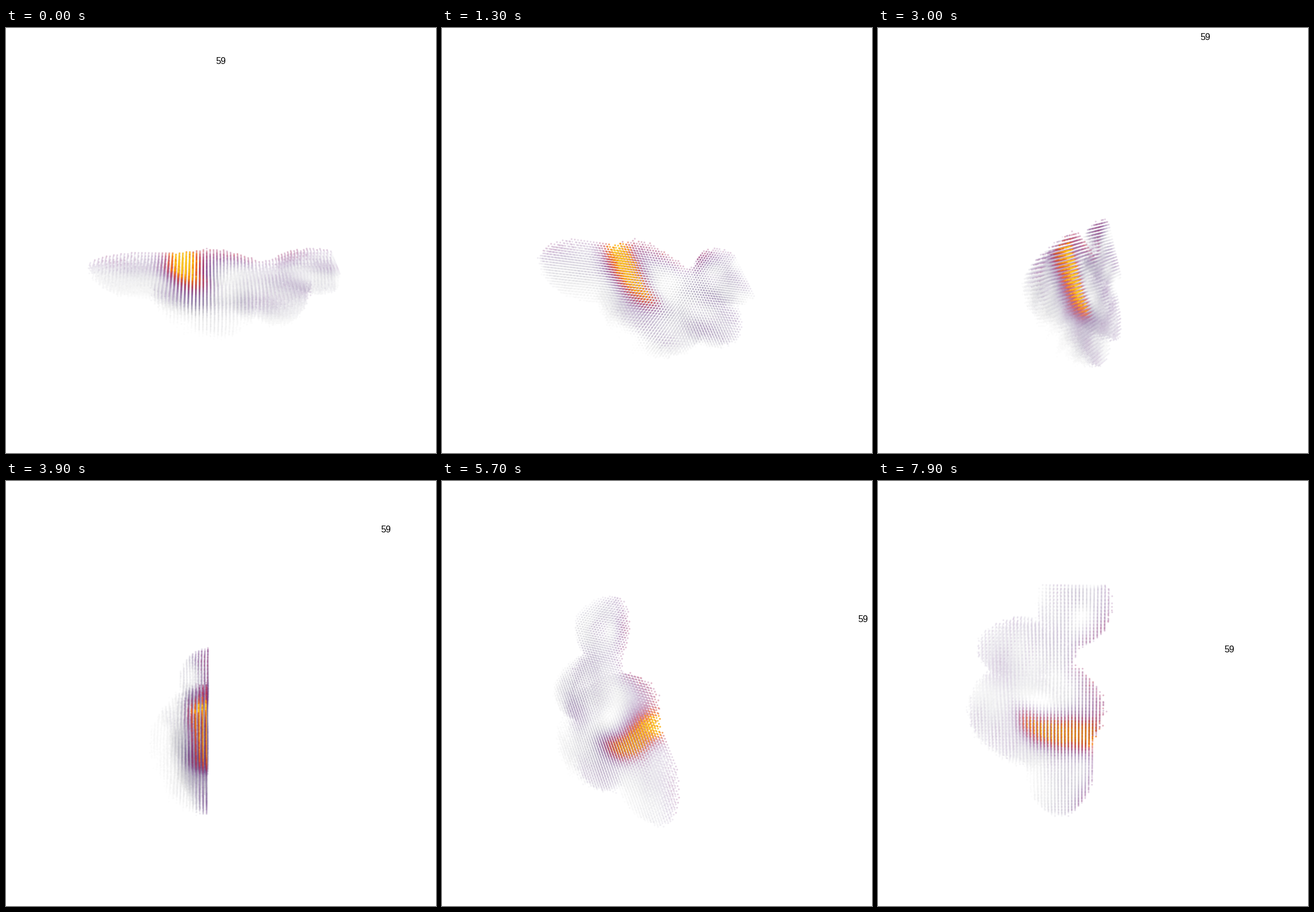
Animation, 753 px wide and 744 px high, one loop 8000 ms. Source, as a matplotlib script:

```python
import numpy as np
import matplotlib.pyplot as plt
from matplotlib.animation import FuncAnimation

W, H, DPI = 753, 744, 100
FRAMES, INTERVAL = 80, 100
START, STEP = np.radians(2), np.radians(3.025)  # turn about the cube diagonal
TILT = np.radians(19.7)                         # camera elevation
DIST = 1415                                     # camera distance in pixels
CX, CY = 376, 372
GRID = 6
MIDLINE = -25
LABEL = (285.4, 0, 269.4)

# half ellipsoids resting on the midline: centre x, y, radii x, y, depth
LOBES = [
    (-98, -20, 116, 100, 100),
    (-58, -120, 62, 104, 58),
    (-110, 90, 84, 56, 75),
    (-32, 165, 62, 72, 56),
]


def smooth_noise(rng, *axes, waves=7):
    """Sum of random plane waves, roughly within -1..1."""
    total = 0
    for _ in range(waves):
        k = rng.normal(0, 1 / 14, len(axes))
        phase = rng.uniform(0, 2 * np.pi)
        total = total + np.cos(sum(a * f for a, f in zip(axes, k)) + phase)
    return total / np.sqrt(waves)


def bump(*pairs):
    """Gaussian of (offset, spread) pairs."""
    return np.exp(-sum((d / s) ** 2 for d, s in pairs))


def build_cloud():
    rng = np.random.default_rng(59)
    x, y, z = (a.ravel().astype(float) for a in np.meshgrid(
        np.arange(-216, 37, GRID), np.arange(-222, 203, GRID),
        np.arange(0, 109, GRID)))

    radius = np.min([np.sqrt(((x - cx) / rx) ** 2 + ((y - cy) / ry) ** 2
                             + (z / rz) ** 2)
                     for cx, cy, rx, ry, rz in LOBES], axis=0)
    inside = radius < 1 + rng.normal(0, .02, len(x))
    x, y, z, radius = (a[inside] for a in (x, y, z, radius))

    # faint tissue, patchy and thinning out sideways and towards the belly
    v = .115 * np.exp(-z / 34) + .05
    v *= 1 + .5 * smooth_noise(rng, x, y, z)
    v *= .7 + .3 / (1 + np.exp(-(x + 0.5 * y + 95) / 20))

    # purple rim on the back, belly streak and glow around the band
    back = 1 / (1 + np.exp(-(x + 50) / 12))
    v += .19 * back * bump((1 - radius, .25), (z, 26))
    v += .12 * bump((x + 150, 25), (y - 60, 45), (z - 22, 25))
    v += .16 * bump((x + 60, 85), (y + 55, 48), (z, 26))

    # hollows
    v *= 1 - .85 * bump((x + 90, 42), (y - 5, 25))
    v *= 1 - .7 * bump((x + 20, 20), (y - 150, 22))

    # bright curved band
    mid = -64 + 26 * np.clip((-60 - x) / 62, 0, 1.3) ** 2
    v += (.66 * bump((y - mid, 28), (z - 6, 24))
          / (1 + ((x + 58) / 68) ** 8))
    v *= rng.normal(1, .07, len(v))

    keep = v > .045
    v = np.clip(v[keep], 0, .86)
    rgba = plt.get_cmap("inferno")(v)
    rgba[:, 3] = np.clip(v ** 1.6 * 1.15, 0, .9)
    return x[keep], y[keep], MIDLINE - z[keep], rgba


def project(x, y, z, phi):
    c, s = (1 - np.cos(phi)) / 3, np.sin(phi) / np.sqrt(3)
    p, q, r = 1 - 2 * c, c + s, c - s
    right = p * y + q * z + r * x
    up = p * z + q * x + r * y
    deep = p * x + q * y + r * z
    v = np.cos(TILT) * up + np.sin(TILT) * deep
    away = np.cos(TILT) * deep - np.sin(TILT) * up
    k = 1 / (1 + away / DIST)
    return CX + right * k, CY - v * k, away


X, Y, Z, RGBA = build_cloud()

fig = plt.figure(figsize=(W / DPI, H / DPI), dpi=DPI, facecolor="white")
ax = fig.add_axes([0, 0, 1, 1])
ax.set_xlim(0, W)
ax.set_ylim(H, 0)
ax.axis("off")
dots = ax.scatter(X, Y, s=5.2, linewidths=0)
label = ax.text(0, 0, "59", family="Liberation Sans", fontsize=11.5,
                color="black", ha="center", va="center_baseline")


def draw(frame):
    phi = START + frame * STEP
    px, py, away = project(X, Y, Z, phi)
    order = np.argsort(-away)
    dots.set_offsets(np.column_stack([px, py])[order])
    dots.set_facecolors(RGBA[order])

    lx, ly, _ = project(*LABEL, phi)
    label.set_position((lx, ly))
    label.set_visible(bool(ly >= 0))
    return dots, label


anim = FuncAnimation(fig, draw, frames=FRAMES, interval=INTERVAL,
                     repeat=True, repeat_delay=0)
plt.show()
```
